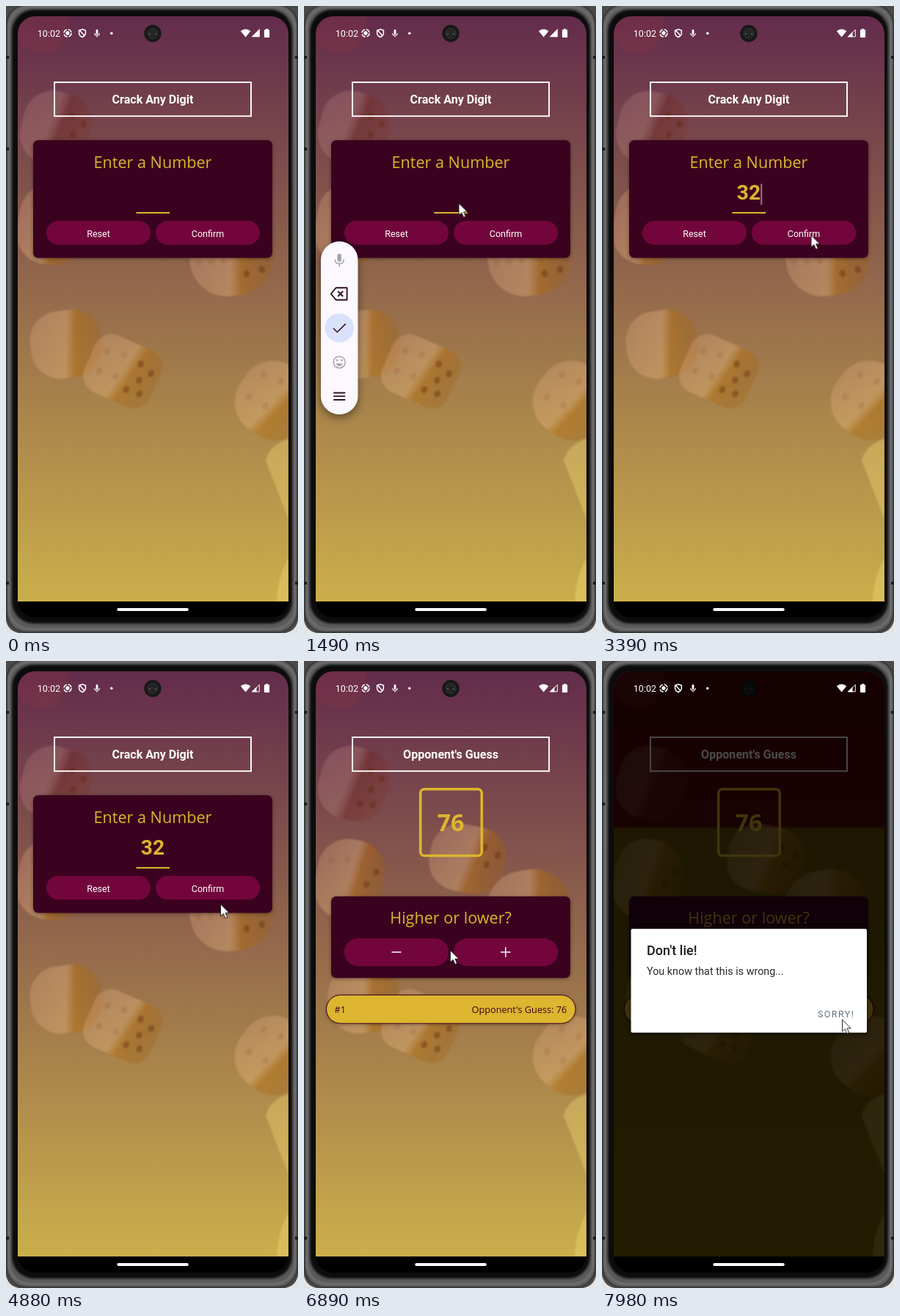
These frames come from a looping animation (398 by 855 pixels, 8 s). An HTML page:

```html
<!DOCTYPE html>
<html lang="en">
<head>
<meta charset="utf-8">
<title>Number game</title>
<style>
html, body { margin: 0; width: 100%; height: 100%; overflow: hidden; background: #333; }
svg { display: block; width: 398px; height: 855px; }
text { font-family: Roboto, sans-serif; font-size: 12.55px; fill: #fff; }
.mid { text-anchor: middle; }
.end { text-anchor: end; }
.title { font-size: 16.1px; font-weight: 700; }
.os { font-family: "Open Sans", sans-serif; fill: #ddb52f; }
.head { font-size: 21.6px; }
.value { font-size: 28.2px; font-weight: 700; fill: #ddb52f; }
.row { font-size: 12.7px; fill: #3b021f; }
.card { fill: #3b021f; filter: drop-shadow(0 1.5px 2.5px #0006); }
.btn { fill: #72063c; }
.line { fill: none; stroke: #fff; stroke-width: 1.5; }
.dark { stroke: #30121f; }
.grey { stroke: #a5a3a8; }

/* 1% = 80 ms */
.anim { animation: 8s linear infinite; }
.cut { animation: 8s step-end infinite; }
#entry { animation-name: entry; }
#guess { animation-name: guess; }
#one { animation-name: one; }
#two { animation-name: two; }
#caret { animation-name: caret; }
#sigA { animation-name: sigA; }
#sigB { animation-name: sigB; }
#tools { animation-name: tools; }
#tint { animation-name: tint; }
#dim { animation-name: dim; }
#dialog { animation-name: dialog; }
#mouse { animation-name: mouse; }
#sorry { animation-name: sorry; }

@keyframes entry { 0% { opacity: 1 } 66.87%, 100% { opacity: 0 } }
@keyframes guess { 0% { opacity: 0 } 66.87%, 100% { opacity: 1 } }
@keyframes one { 0%, 33.75%, 100% { opacity: 0 } 30.37% { opacity: 1 } }
@keyframes two { 0% { opacity: 0 } 33.75%, 100% { opacity: 1 } }
@keyframes caret {
  0%, 17.5% { opacity: 0; transform: none }
  11.25%, 23.62% { opacity: 1; transform: none }
  30.37% { opacity: 1; transform: translateX(8px) }
  33.75% { opacity: 1; transform: translateX(16.5px) }
  43.12%, 100% { opacity: 0 }
}
@keyframes sigA { 0% { opacity: 1 } 33%, 100% { opacity: 0 } }
@keyframes sigB { 0% { opacity: 0 } 33%, 100% { opacity: 1 } }
@keyframes tools {
  0%, 13.5% { opacity: 0; transform: translateX(-7px) }
  16.5%, 34.8% { opacity: 1; transform: none }
  36.5%, 100% { opacity: 0; transform: none }
}
@keyframes tint { 0%, 91.3% { opacity: 0 } 93%, 100% { opacity: 1 } }
@keyframes dim { 0%, 90.1% { opacity: 0 } 91.3% { opacity: .68 } 93%, 100% { opacity: .71 } }
@keyframes dialog { 0%, 90.1% { opacity: 0 } 91.3% { opacity: .87 } 92.3%, 100% { opacity: 1 } }
@keyframes sorry { 0%, 91.4% { fill: #326087 } 94%, 100% { fill: #61747f } }
@keyframes mouse {
  0%, 1.61% { opacity: 0; transform: translate(359px, 788px) }
  1.625% { opacity: 1; transform: translate(359px, 788px); animation-timing-function: ease-in-out }
  11.25% { transform: translate(210px, 266px) }
  12.9%, 34.75% { transform: translate(210.5px, 268.5px); animation-timing-function: ease-in-out }
  39% { transform: translate(276px, 300px) }
  42.37% { transform: translate(284.5px, 312px) }
  44% { transform: translate(285px, 318px) }
  46.5%, 50.5% { transform: translate(277px, 323px) }
  54.9%, 56.6% { transform: translate(277px, 305px) }
  58.5% { transform: translate(282px, 300px) }
  61% { transform: translate(292px, 331px) }
  63% { transform: translate(292px, 355px) }
  66%, 71.1% { transform: translate(286px, 311px); animation-timing-function: ease-in-out }
  75.3%, 80.2% { transform: translate(285.5px, 394px) }
  83.5%, 84.4% { transform: translate(151px, 405px) }
  86.1% { transform: translate(198px, 394px) }
  88.6%, 91.5% { transform: translate(255px, 392px); animation-timing-function: ease-in-out }
  98%, 100% { opacity: 1; transform: translate(327px, 488.5px) }
}
</style>
</head>
<body>
<svg viewBox="0 0 398 855">
  <defs>
    <linearGradient id="sky" x2="0" y2="1">
      <stop stop-color="#632c4c"/><stop offset="1" stop-color="#cbaf4b"/>
    </linearGradient>
    <linearGradient id="faces" x2="1" y2=".15">
      <stop stop-color="#f0b890" stop-opacity=".24"/><stop offset=".55" stop-color="#f0bc84" stop-opacity=".36"/>
      <stop offset=".68" stop-color="#b87010" stop-opacity=".45"/><stop offset="1" stop-color="#a06010" stop-opacity=".3"/>
    </linearGradient>
    <linearGradient id="plum" x2="1" y2=".15">
      <stop stop-color="#d098a0" stop-opacity=".22"/><stop offset=".45" stop-color="#d0988c" stop-opacity=".26"/>
      <stop offset=".62" stop-color="#702418" stop-opacity=".36"/><stop offset="1" stop-color="#803028" stop-opacity=".24"/>
    </linearGradient>
    <linearGradient id="night" x2="0" y2="1">
      <stop stop-color="#480000"/><stop offset=".264" stop-color="#500000"/>
      <stop offset=".27" stop-color="#645200"/><stop offset="1" stop-color="#705a00"/>
    </linearGradient>
    <clipPath id="screen"><path d="M16 834V38a24 24 0 0 1 24-24H361a24 24 0 0 1 24 24V834Z"/></clipPath>
  </defs>

  <!-- phone body -->
  <rect width="398" height="855" fill="#4a4a4a"/>
  <path d="M0 838V855H17Q3 852 0 838ZM398 838V855H381Q395 852 398 838Z" fill="#e4e4e4"/>
  <rect x="1" y="-2" width="396" height="856" rx="27" fill="#5a5a5a" stroke="#383838" stroke-width="2"/>
  <rect x="4" y="1.5" width="390" height="848" rx="28" fill="none" stroke="#747474" stroke-width="2.5" style="filter:blur(1px)"/>
  <rect x="8" y="5" width="382" height="837" rx="30" fill="#0c0c0c" style="filter:blur(1.5px)"/>
  <path d="M0 70h4M0 195h4M0 787h4M394 70h4M394 787h4" stroke="#1c1c1c" stroke-width="4"/>
  <rect x="16" y="780" width="369" height="54" rx="24"/>

  <g clip-path="url(#screen)">
    <rect x="16" y="14" width="369" height="798" fill="url(#sky)"/>
    <rect id="tint" class="anim" x="16" y="14" width="369" height="798" fill="url(#night)" fill-opacity=".92"/>
    <svg width="398" height="812" viewBox="0 0 398 812" style="height:812px">
      <g id="dice" style="filter:blur(.9px)">
        <path d="M16 14H86Q82 64 52 65Q30 64 16 48Z" fill="#a03a40" opacity=".2"/>
        <path d="M354 620Q358 600 385 590V700Z" fill="#ffe07a" opacity=".33"/>
        <path d="M385 752Q370 780 369 812H385Z" fill="#ffe07a" opacity=".33"/>
      </g>
    </svg>
    <rect x="66" y="104" width="268" height="46.2" fill="none" stroke="#fff" stroke-width="1.9"/>
    <circle cx="200" cy="37.5" r="11.7" fill="#181818"/>
    <circle cx="200" cy="37.5" r="7" fill="#242424" stroke="#343434"/>
    <path d="M196 38h.1M204 38h.1" stroke="#666" stroke-width="1.8" stroke-linecap="round"/>

    <g id="entry" class="cut">
      <text class="title mid" x="200" y="133">Crack Any Digit</text>
      <rect class="card" x="37" y="183" width="326" height="160.5" rx="7"/>
      <text class="os head mid" x="200" y="220.5">Enter a Number</text>
      <text id="one" class="value mid cut" x="200" y="264">3</text>
      <text id="two" class="value mid cut" x="200" y="264">32</text>
      <rect id="caret" class="cut" x="200" y="242.5" width="1.4" height="28.5" fill="#b5a5ad"/>
      <rect x="177.5" y="281" width="45.5" height="2" fill="#ddb52f"/>
      <rect class="btn" x="55" y="293" width="142" height="32.6" rx="16.3"/>
      <rect class="btn" x="204" y="293" width="142" height="32.6" rx="16.3"/>
      <text class="mid" x="126" y="314.7">Reset</text>
      <text class="mid" x="275" y="314.7">Confirm</text>
    </g>

    <g id="guess" class="cut">
      <text class="title mid" x="200" y="133">Opponent's Guess</text>
      <rect x="158.7" y="174.7" width="83.6" height="90.8" rx="5.5" fill="none" stroke="#ddb52f" stroke-width="3.6"/>
      <text class="os mid" x="200" y="232" style="font-size:32.3px;font-weight:700">76</text>
      <rect class="card" x="37" y="321" width="326" height="111.3" rx="7"/>
      <text class="os head mid" x="200" y="358">Higher or lower?</text>
      <rect class="btn" x="55" y="378.3" width="142" height="37.6" rx="18.8"/>
      <rect class="btn" x="204" y="378.3" width="142" height="37.6" rx="18.8"/>
      <path class="line" d="M119.5 397h13M268 397h13.5M274.8 390.3v13.5"/>
      <rect x="30.5" y="455.5" width="339.5" height="38.7" rx="19.35" fill="#ddb52f" stroke="#3b021f" style="filter:drop-shadow(0 1.5px 2px #0005)"/>
      <text class="os row" x="41.5" y="479.7">#1</text>
      <text class="os row end" x="358.3" y="479.7">Opponent's Guess: 76</text>
    </g>

    <rect id="dim" class="anim" x="16" y="14" width="369" height="798"/>
  </g>

  <!-- status bar -->
  <text x="42.8" y="41.6">10:02</text>
  <g class="line">
    <circle cx="84" cy="37" r="5" stroke-dasharray="5.9 2"/>
    <circle cx="84" cy="37" r="1.9" fill="#fff"/>
    <path d="M104 31.8l4.4 1.6v3.6q0 3.6-4.4 5.5q-4.4-1.9-4.4-5.5v-3.6ZM100.8 33.5l6.3 7.2"/>
    <path d="M124 33.5v4" stroke-linecap="round" style="stroke-width:2.8"/>
    <path d="M120.8 37q0 3.3 3.2 3.3t3.2-3.3M124 40.3v2.2" style="stroke-width:1.1"/>
  </g>
  <g fill="#fff">
    <circle cx="143.8" cy="37.3" r="1.8"/>
    <path d="M319.8 34.2q6.8-5.6 13.6 0l-6.8 8.3Z"/>
    <path id="sigA" class="cut" d="M334.5 42.3L345.8 31V42.3Z"/>
    <g id="sigB" class="cut">
      <path d="M334.5 42.3L341.5 35.3V42.3Z"/>
      <path d="M336 41.8L345.3 32.3V41.8Z" fill="none" stroke="#fff"/>
    </g>
    <path d="M354 31h3v1.2h1.2q.9 0 .9.9v9q0 .9-.9.9h-5.4q-.9 0-.9-.9v-9q0-.9.9-.9h1.2Z"/>
  </g>
  <rect x="151.3" y="821" width="97.5" height="4" rx="2" fill="#fff"/>

  <!-- floating keyboard bar -->
  <g id="tools" class="anim">
    <rect x="23" y="321" width="50.5" height="236" rx="25.2" fill="#fbf8ff" style="filter:drop-shadow(0 4px 6px #0007)"/>
    <path class="line grey" d="M48.2 340.5v5.5" stroke-linecap="round" style="stroke-width:5.4"/>
    <path class="line grey" d="M42.2 345.5q0 6 6 6t6-6M48.2 351.5v4"/>
    <path class="line dark" d="M43.5 384.3H58.6V400.7H43.5L36.8 392.5ZM46.2 389l7 7M53.2 389l-7 7" stroke-linejoin="round" style="stroke-width:1.9"/>
    <circle cx="48.2" cy="439" r="19.7" fill="#dae1fc"/>
    <path class="line dark" d="M40 439.5l5.2 5.2L56.8 433.4"/>
    <circle class="line grey" cx="48.2" cy="485.7" r="8"/>
    <path class="line grey" d="M45 483h.2M51.3 483h.2" stroke-linecap="round" style="stroke-width:2.6"/>
    <path d="M43.7 487.5h9q-1.2 3.6-4.5 3.6t-4.5-3.6Z" fill="#a5a3a8"/>
    <path class="line dark" d="M40.2 527.5h16M40.2 532.2h16M40.2 537h16" style="stroke-width:1.8"/>
  </g>

  <g id="dialog" class="anim">
    <rect x="39.5" y="365.3" width="321.5" height="141.5" rx="2" fill="#fff" style="filter:drop-shadow(0 2px 3px #0008)"/>
    <text x="61" y="400.8" style="font-size:18px;font-weight:500;fill:#1c1c20">Don't lie!</text>
    <text x="61" y="428.3" style="font-size:14.35px;fill:#2a2a30">You know that this is wrong...</text>
    <text id="sorry" class="anim" x="294" y="486.2" style="letter-spacing:.11em">SORRY!</text>
  </g>

  <path id="mouse" class="anim" d="M.5 .5V16.8L4.3 13.3L7 19.6L9.8 18.4L7.1 12.3H12.2Z" fill="#fff" stroke="#111" stroke-width=".9"/>
</svg>
<script>
const NS = 'http://www.w3.org/2000/svg';
const dice = document.getElementById('dice');

function add(parent, tag, attrs) {
  const el = document.createElementNS(NS, tag);
  for (const key in attrs) el.setAttribute(key, attrs[key]);
  return parent.appendChild(el);
}

// Pip places as fractions of a die's half size: pale face, then shaded face
const pale = [[-.62, -.4], [-.15, -.5], [-.6, .3], [-.12, .25]];
const shade = [[.38, -.45], [.75, -.3], [.52, .05], [.3, .5], [.68, .45]];

function die(x, y, w, h, turn, round, fill, pips) {
  const g = add(dice, 'g', { transform: `translate(${x} ${y}) rotate(${turn})` });
  add(g, 'rect', { x: -w / 2, y: -h / 2, width: w, height: h, rx: round, fill: `url(#${fill})` });
  for (const [u, v] of pips) {
    add(g, 'ellipse', {
      cx: u * w / 2, cy: v * h / 2, rx: 4.2, ry: 5,
      fill: u > .2 ? '#5a2408' : '#8a5030', opacity: u > .2 ? .36 : .2
    });
  }
}

die(68, 167, 94, 100, 14, 40, 'plum', shade);
die(62, 298, 92, 110, 10, 42, 'faces', [...pale.slice(0, 2), ...shade.slice(1, 4)]);
die(223, 270, 104, 92, 12, 40, 'faces', shade.slice(0, 3));
die(307, 340, 114, 110, -8, 50, 'faces', [[-.8, .05], [-.5, .08], [-.2, .1], ...shade.slice(2)]);
die(82, 461, 98, 92, -8, 40, 'faces', []);
die(159, 498, 98, 84, 24, 24, 'faces', [...pale, ...shade]);
die(366, 538, 104, 104, 35, 46, 'faces', [...pale, ...shade.slice(0, 2)]);
</script>
</body>
</html>
```
